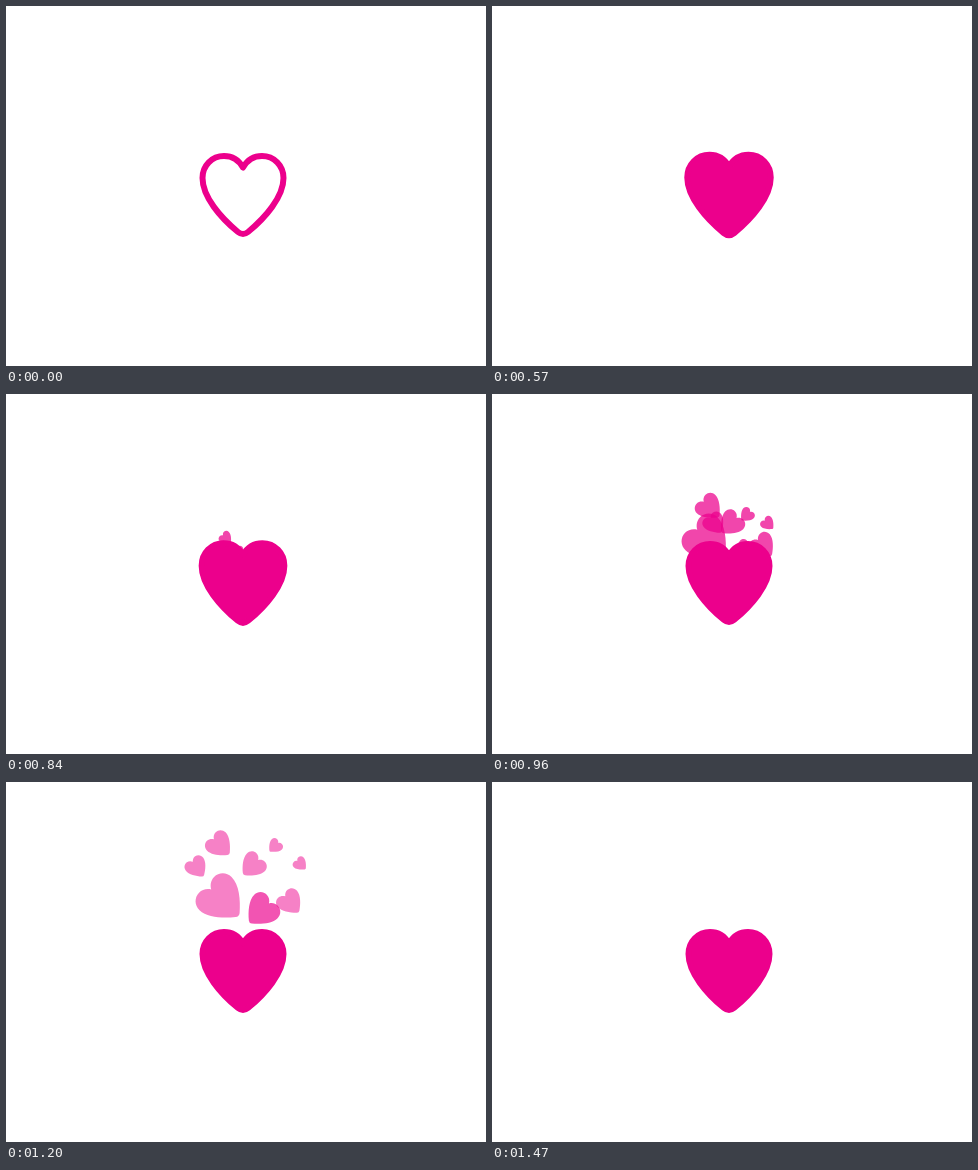
Write an HTML page with a canvas that moves like this. It is 480 px wide and 360 px high and loops after 3.6 s.

```html
<!DOCTYPE html>
<html lang="en">
<head>
<meta charset="utf-8">
<title>Heart burst</title>
<style>
  html, body { margin: 0; width: 100%; height: 100%; overflow: hidden; background: #fff; }
  canvas { display: block; width: 480px; height: 360px; }
</style>
</head>
<body>
<canvas id="stage" width="480" height="360"></canvas>
<script>
const ctx = document.getElementById('stage').getContext('2d');
const LOOP = 3600, STEP = 30;
const FILL_AT = 390, PEAK_AT = 720, REST_AT = 930, BURST_AT = 780, END_AT = 1470;
const PINK = '#ec008c';

// Centre line of the 6px outline, around (0, 0).
const heart = new Path2D(
  'M0-27.5C-4-34.5-11-39-19-39C-31-39-40.5-29.5-40.5-17C-40.5 2-22 23-5 37' +
  'Q0 41 5 37C22 23 40.5 2 40.5-17C40.5-29.5 31-39 19-39C11-39 4-34.5 0-27.5Z');

// Each path passes through three points at the times in KEYS, plus the delay.
const KEYS = [960, 1080, 1290];
const sparks = [
  { size: .53,  turn: -46, x: [216.5, 216.5, 216.5], y: [146.5, 132.5, 107.5] },
  { size: .30,  turn: -45, x: [218, 216, 213],       y: [114, 87, 48] },
  { size: .25,  turn: -36, x: [223, 205.5, 182.5],   y: [130, 106, 73] },
  { size: .29,  turn: 45,  x: [238.5, 242.5, 248.5], y: [130, 105, 71] },
  { size: .165, turn: 45,  x: [254.5, 262.3, 272.5], y: [121.3, 90.3, 48.5] },
  { size: .16,  turn: -45, x: [276.2, 286.2, 300.2], y: [130, 104, 69] },
  { size: .29,  turn: -40, x: [271.5, 277.8, 290.5], y: [152.5, 136.5, 109.5] },
  { size: .38,  turn: 45,  x: [253.5, 255, 257],     y: [141, 129.4, 113.8], delay: 120 }
];

const clamp = v => Math.max(0, Math.min(1, v));
const smooth = v => { v = clamp(v); return v * v * (3 - 2 * v); };

function along(p, t) {
  const [a, b, c] = KEYS;
  const v1 = (p[1] - p[0]) / (b - a);
  const v2 = (p[2] - p[1]) / (c - b);
  return p[0] + v1 * (t - a) + (v2 - v1) / (c - a) * (t - a) * (t - b);
}

function place(x, y, scale, turn, paint) {
  ctx.save();
  ctx.translate(x, y);
  ctx.rotate(turn * Math.PI / 180);
  ctx.scale(scale, scale);
  paint();
  ctx.restore();
}

function drawSpark(s, time) {
  const t = time - (s.delay || 0);
  const grow = smooth((t - BURST_AT) / 120);
  const alpha = .73 * (1 - Math.pow(clamp((t - 870) / 480), 3));
  if (grow <= 0 || alpha <= 0) return;
  ctx.globalAlpha = alpha;
  place(along(s.x, t), along(s.y, t), s.size * grow * 1.074, s.turn, () => ctx.fill(heart));
  ctx.globalAlpha = 1;
}

function drawMain(t) {
  const beat = t < PEAK_AT
    ? smooth((t - FILL_AT) / (PEAK_AT - FILL_AT))
    : smooth((REST_AT - t) / (REST_AT - PEAK_AT));
  place(237, 189, 1 + .05 * beat, 0, () => {
    if (t >= FILL_AT) ctx.fill(heart);
    ctx.stroke(heart);
  });
}

function frame(now) {
  const t = Math.floor(now % LOOP / STEP) * STEP;
  ctx.fillStyle = '#fff';
  ctx.fillRect(0, 0, 480, 360);
  ctx.fillStyle = ctx.strokeStyle = PINK;
  ctx.lineWidth = 6;
  ctx.lineJoin = 'round';
  if (t < END_AT) sparks.forEach(s => drawSpark(s, t));
  drawMain(t);
}

const start = performance.now();
function tick() {
  frame(performance.now() - start);
  requestAnimationFrame(tick);
}
tick();
</script>
</body>
</html>
```
